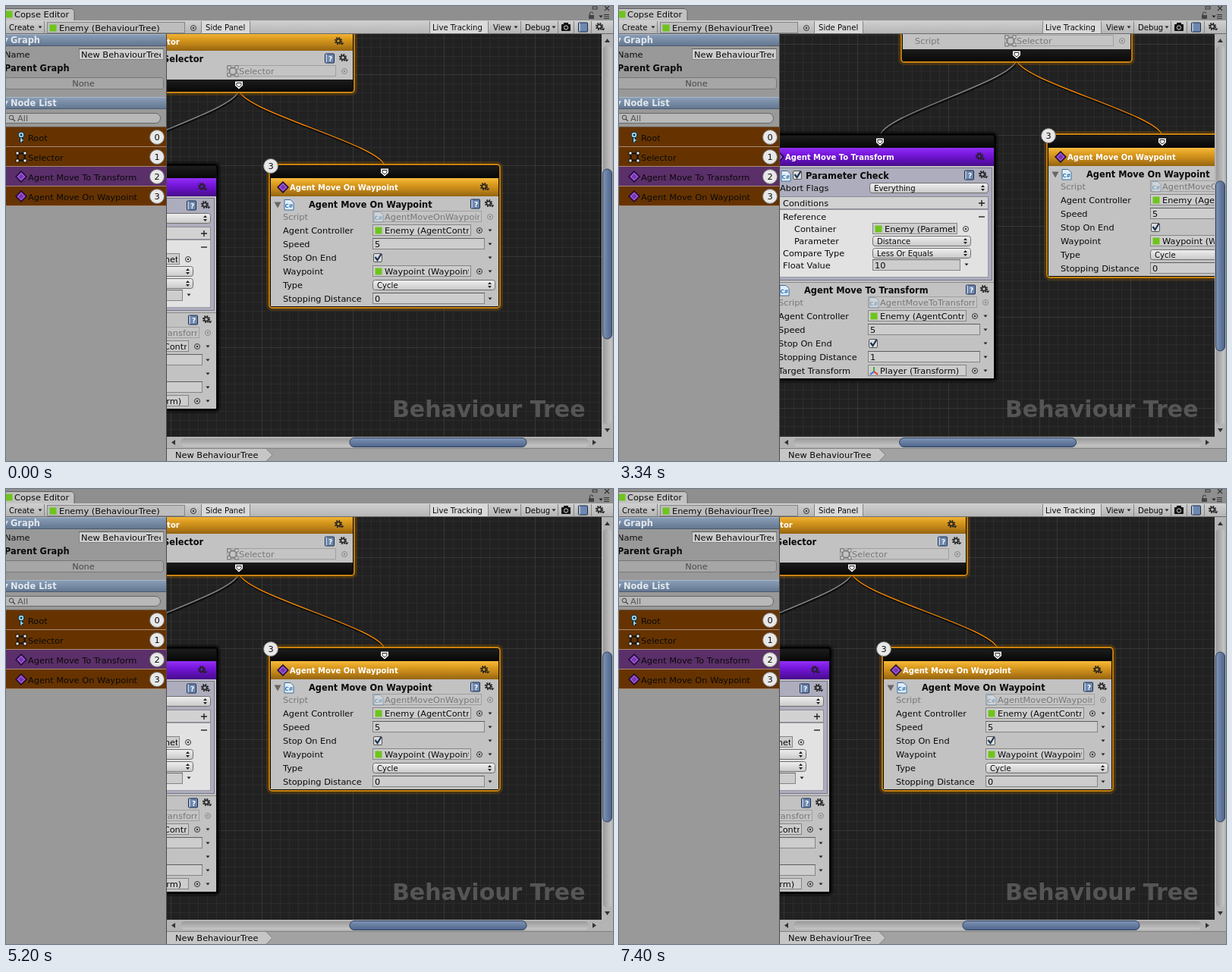
Recreate the animation shown at these times as an HTML page. Size 800 px wide and 600 px high, loop 9.23 s.

```html
<!DOCTYPE html>
<html lang="en">
<head>
<meta charset="utf-8">
<title>Behaviour Tree</title>
<style>
html, body { margin: 0; width: 100%; height: 100%; overflow: hidden; background: #999; }
svg { display: block; }
text { font: 11.35px "DejaVu Sans", sans-serif; fill: #0a0a0a; white-space: pre; }
text.b { font-weight: bold; font-size: 11.4px; }
text.h { font-weight: bold; font-size: 10px; fill: #fff; }
text.s { font-size: 10.1px; }
text.dim { fill: #777; }
.frame { fill: #0a0a0a; stroke: #000; stroke-width: 2; }
.glow { fill: none; stroke: #000; stroke-width: 6; opacity: .35; }
.head { fill: url(#purple); }
.on .frame { stroke: #c9830f; stroke-width: 1.8; }
.on .glow { stroke: #8a5500; }
.on .head { fill: url(#gold); }
.link { fill: none; stroke: #8c8c8c; stroke-width: 1.3; }
.link.on { stroke: #ff8a00; }
.row { fill: #5b2f69; }
.row.on { fill: #663300; }
</style>
</head>
<body>
<svg id="stage" width="800" height="600" viewBox="0 0 800 600"></svg>
<script>
const stage = document.getElementById('stage');

// drawing helpers: each returns SVG markup
const rect = (x, y, w, h, fill, more = '') =>
  `<rect x="${x}" y="${y}" width="${w}" height="${h}" fill="${fill}" ${more}/>`;
const text = (x, y, s, cls = '', more = '') => `<text x="${x}" y="${y}" class="${cls}" ${more}>${s}</text>`;
const path = (d, fill = 'none', stroke = 'none', w = 1, more = '') =>
  `<path d="${d}" fill="${fill}" stroke="${stroke}" stroke-width="${w}" ${more}/>`;
const disc = (x, y, r, fill, stroke = 'none') => `<circle cx="${x}" cy="${y}" r="${r}" fill="${fill}" stroke="${stroke}"/>`;
const group = (x, y, body) => `<g transform="translate(${x} ${y})">${body}</g>`;
const clip = (x, y, w, h, body) =>
  `<svg x="${x}" y="${y}" width="${w}" height="${h}" viewBox="${x} ${y} ${w} ${h}">${body}</svg>`;
const fade = (id, stops, flat) => `<linearGradient id="${id}" x2="${flat ? 1 : 0}" y2="${flat ? 0 : 1}">` +
  stops.map((c, i) => `<stop offset="${i / (stops.length - 1)}" stop-color="${c}"/>`).join('') + '</linearGradient>';

// small icons, centred on x, y
const arrow = (x, y) => path(`M${x - 2.5} ${y - 1.5}h5l-2.5 3z`, '#222');
const picker = (x, y, c = '#333') => disc(x, y, 3.5, 'none', c) + disc(x, y, 1.2, c);
const gear = (x, y, drop = true) =>
  `<circle cx="${x}" cy="${y}" r="4" fill="none" stroke="#222" stroke-width="2.2" stroke-dasharray="1.7 1.44"/>` +
  `<circle cx="${x}" cy="${y}" r="2.6" fill="none" stroke="#222" stroke-width="1.5"/>` + (drop ? arrow(x + 5, y + 4) : '');
const book = (x, y, mark = '?') => rect(x - 5.5, y - 6, 12, 12, '#6d88b0', 'rx="1" stroke="#1b2b48"') +
  path(`M${x - 4} ${y - 5.5}v11`, 'none', '#d5e0f0', 1.2) +
  text(x + 1.5, y + 3.5, mark, 'h', 'text-anchor="middle" style="font-size:9px"');
const script = (x, y, o = 1) => `<g opacity="${o}">` +
  path(`M${x - 6} ${y - 6.5}h8l4 4v9.5h-12z`, '#e3edf5', '#3b6f9f') +
  text(x, y + 4, 'C#', 'b', 'text-anchor="middle" style="fill:#2b78b8;font-size:7px"') + '</g>';
const asset = (x, y) => rect(x - 4.5, y - 4.5, 9, 9, '#6fc41c');
const axes = (x, y) => path(`M${x} ${y + 1}v-6`, 'none', '#3fae2a', 2) +
  path(`M${x} ${y + 1}l-5 4`, 'none', '#3b6fd8', 2) + path(`M${x} ${y + 1}l5 4`, 'none', '#d8452a', 2);
const boxes = (x, y, o = 1) => `<g opacity="${o}">` + rect(x - 4.5, y - 4.5, 9, 9, 'none', 'stroke="#111" stroke-width="2"') +
  [[-1, -1], [1, -1], [-1, 1], [1, 1]].map(([i, j]) => rect(x + i * 5 - 2, y + j * 5 - 2, 4, 4, '#eee', 'stroke="#111"')).join('') + '</g>';
const diamond = (x, y) => path(`M${x} ${y - 7}l7 7-7 7-7-7z`, '#7a35b4', '#1c0830', 1.4) +
  path(`M${x} ${y - 4.5}l4.5 4.5-4.5 4.5-4.5-4.5z`, 'none', '#c48cf0', .8);
const shield = (x, y) => path(`M${x - 5.5} ${y - 5}h11v6l-5.5 5-5.5-5z`, '#fff', '#111', 1) +
  path(`M${x - 3} ${y - 2.5}h6v3l-3 2.5-3-2.5z`, 'none', '#222', 1);
const badge = (x, y, n) => disc(x, y, 9.5, '#e8e8e8', '#777') + text(x, y + 4, n, '', 'text-anchor="middle"');
const fold = (x, y) => path(`M${x - 4.5} ${y - 3.5}h9l-4.5 8z`, '#666');

// form controls, y is the middle of the row
const field = (x, y, w, s) => rect(x + .5, y - 7.5, w - 1, 14, '#cdcdcd', 'stroke="#858585"') +
  path(`M${x} ${y - 7.5}h${w}`, 'none', '#5e5e5e') + text(x + 3, y + 4, s);
const popup = (x, y, w, s) => rect(x + .5, y - 6.5, w - 1, 13, 'url(#button)', 'rx="3" stroke="#6e6e6e"') +
  text(x + 6, y + 3.5, s, 's') + path(`M${x + w - 10} ${y - 1}h5l-2.5-3zM${x + w - 10} ${y + 1}h5l-2.5 3z`, '#222');
const check = (x, y) => rect(x - 5.5, y - 5.5, 11, 11, '#dcdcdc', 'rx="1.5" stroke="#555"') +
  path(`M${x - 3.5} ${y - 1}l3 4 5-8`, 'none', '#1d3555', 2.2);
const object = (x, y, w, s, icon = asset) => rect(x + .5, y - 7.5, w - 1, 14, '#cdcdcd', 'stroke="#858585"') +
  icon(x + 8, y) + clip(x, y - 8, w - 3, 16, text(x + 16, y + 4, s)) + picker(x + w + 11, y);
const ghost = (x, y, w, s, icon) => rect(x + .5, y - 7.5, w - 1, 14, '#c4c4c4', 'stroke="#a0a0a0"') +
  icon(x + 8, y, .4) + clip(x, y - 8, w - 3, 16, text(x + 16, y + 4, s, 'dim')) + picker(x + w + 11, y, '#888');

const control = {
  num: (y, s) => field(483, y, 148, s) + arrow(638, y),
  obj: (y, s) => object(483, y, 130, s) + arrow(638, y),
  pos: (y, s) => object(483, y, 130, s, axes) + arrow(638, y),
  tick: y => check(490, y) + arrow(638, y),
  pick: (y, s) => popup(483, y, 162, s)
};

const behaviour = (y, title, cls, rows) =>
  fold(358, y) + script(373, y) + text(399, y + 4, title, 'b') + book(618, y - 1) + gear(636, y - 2) +
  text(365, y + 20, 'Script', 'dim') + ghost(483, y + 16, 144, cls, script) +
  rows.map(([label, kind, s], i) => {
    const c = y + 34 + i * 18;
    return text(365, c + 4, label) + control[kind](c, s);
  }).join('');

const shell = (id, x, y, h, bodyY, bodyH, body) => `<g id="${id}">` +
  rect(x - 1, y - 1, 306, h + 2, 'none', 'class="glow" rx="5"') +
  rect(x, y, 304, h, 'none', 'class="frame" rx="4"') +
  rect(x + 2, y + 2, 300, 15, 'url(#slot)') +
  rect(x + 2, bodyY - 24, 300, 24, 'none', 'class="head"') +
  rect(x + 2, bodyY, 300, bodyH, '#c2c2c2') + body + '</g>';

const titleBar = (y, title, n) => badge(349, y - 28, n) + shield(499, y - 20) + diamond(365, y) +
  text(374, y + 4, title, 'h') + gear(630, y - 1);

const parameterCheck = () =>
  rect(351.5, 185.5, 295, 148, '#adadbd', 'stroke="#77778f"') +
  fold(360, 196) + script(375, 196) + check(390, 195) + text(401, 200, 'Parameter Check', 'b') +
  book(616, 195) + gear(634, 194) +
  text(367, 216, 'Abort Flags') + popup(485, 212, 157, 'Everything') +
  rect(366.5, 223.5, 275, 16, '#d2d2d2', 'stroke="#8b8b95"') + text(371, 236, 'Conditions') +
  path('M629 232h8M633 228v8', 'none', '#222', 1.4) +
  rect(366.5, 240.5, 275, 89, '#e2e2e2', 'stroke="#9a9aa4"') +
  text(371, 254, 'Reference') + path('M629 250h8', 'none', '#222', 1.4) +
  text(386, 270, 'Container') + object(489, 266, 112, 'Enemy (ParameterContainer)') +
  text(386, 286, 'Parameter') + popup(489, 282, 130, 'Distance') +
  text(371, 302, 'Compare Type') + popup(489, 298, 130, 'Less Or Equals') +
  text(371, 318, 'Float Value') + field(489, 314, 116, '10') + arrow(613, 313);

const moveTo = shell('move', 347, 141, 324, 183, 280,
  titleBar(171, 'Agent Move To Transform', 2) + parameterCheck() +
  path('M349 336.5h300', 'none', '#8a8a8a') +
  behaviour(347, 'Agent Move To Transform', 'AgentMoveToTransform', [
    ['Agent Controller', 'obj', 'Enemy (AgentController)'], ['Speed', 'num', '5'], ['Stop On End', 'tick'],
    ['Stopping Distance', 'num', '1'], ['Target Transform', 'pos', 'Player (Transform)']]));

const patrol = shell('patrol', 347, 209, 189, 251, 145,
  titleBar(239, 'Agent Move On Waypoint', 3) +
  behaviour(262, 'Agent Move On Waypoint', 'AgentMoveOnWaypoint', [
    ['Agent Controller', 'obj', 'Enemy (AgentController)'], ['Speed', 'num', '5'], ['Stop On End', 'tick'],
    ['Waypoint', 'obj', 'Waypoint (Waypoint)'], ['Type', 'pick', 'Cycle'], ['Stopping Distance', 'num', '0']]));

const selector = shell('selector', 155, 17, 97, 59, 38,
  boxes(172, 47) + text(182, 51, 'Selector', 'h') + gear(438, 46) +
  fold(166, 69) + boxes(181, 69) + text(207, 74, 'Selector', 'b') + book(426, 69) + gear(444, 68) +
  text(173, 90, 'Script', 'dim') + ghost(291, 86, 144, 'Selector', boxes) +
  rect(157, 97, 300, 16, 'url(#slot)') + shield(307, 104));

const link = (id, x) => {
  const d = `M307 110C307 138 ${x} 184 ${x} 212`;
  return group(1, 2, path(d, 'none', '#000', 2, 'opacity=".6"')) + `<path id="${id}" class="link" d="${d}"/>`;
};

const listRow = (i, name, icon, id = '') => {
  const y = 160 + i * 26;
  return `<rect id="${id}" class="row on" x="0" y="${y}" width="211" height="25"/>` +
    rect(0, y + 25, 211, 1, '#a98a72') + icon(20, y + 13) + text(29, y + 18, name) + badge(199, y + 13, i);
};
const key = (x, y) => path(`M${x} ${y}v7M${x} ${y + 4}h3`, 'none', '#123', 4) +
  path(`M${x} ${y}v6.5M${x} ${y + 4}h2.5`, 'none', '#8fd0e0', 2) +
  disc(x, y - 3, 4, '#8fd0e0', '#123') + disc(x, y - 3, 1.3, '#123');
const section = (y, name) => rect(0, y, 211, 16, 'url(#section)') + path(`M0 ${y + .5}h211`, 'none', '#a9b8ca') +
  path(`M0 ${y + 15.5}h211`, 'none', '#4b5b70') + path(`M-3 ${y + 5}h6l-3 6z`, '#d4dde8') +
  text(6, y + 12, name, 'b', 'style="fill:#e2e8ee"');

const sidebar = rect(0, 37, 211, 563, '#999') + section(37, 'Graph') +
  text(-2, 68, 'Name') + clip(96, 55, 112, 18, field(96, 64, 112, '') + clip(96, 56, 108, 16, text(99, 68, 'New BehaviourTree'))) +
  text(-2, 86, 'Parent Graph', 'b') +
  rect(-5, 94.5, 212.5, 15, '#a6a6a6', 'rx="3" stroke="#777"') +
  text(102, 106, 'None', '', 'text-anchor="middle" style="fill:#4a4a4a"') +
  section(120, 'Node List') +
  rect(-8, 141.5, 211.5, 13, '#b8b8b8', 'rx="6.5" stroke="#666"') +
  disc(7, 147, 2.8, 'none', '#444') + path('M9 149l3 3', 'none', '#444', 1.3) + text(15, 152, 'All', '', 'style="fill:#555"') +
  rect(0, 159, 211, 1, '#6e5a4a') +
  listRow(0, 'Root', key) + listRow(1, 'Selector', boxes) +
  listRow(2, 'Agent Move To Transform', diamond, 'rowMove') +
  listRow(3, 'Agent Move On Waypoint', diamond, 'rowPatrol') +
  rect(211, 37, 1, 563, '#4c4c4c');

const split = x => path(`M${x + .5} 20v17`, 'none', '#858585');
const toolbar = rect(0, 0, 800, 20, '#8f8f8f') +
  path('M-2 20V3.5H87l3 3V20z', '#c2c2c2', '#5f5f5f') + asset(4, 11) + text(11, 15, 'Copse Editor') +
  rect(773, 1, 6, 3, 'none', 'stroke="#333"') + path('M789 0l6 6m0-6l-6 6', 'none', '#333', 1.2) +
  rect(768, 12, 7, 5, '#444') + path('M769.5 12v-2a2 2 0 0 1 4 0', 'none', '#444', 1.2) +
  arrow(784, 14) + path('M788 11.5h7M788 14h7M788 16.5h7', 'none', '#333') +
  rect(0, 19, 800, 18, 'url(#bar)') + path('M0 36.5h800', 'none', '#6b6b6b') +
  text(4, 32, 'Create', 's') + arrow(45, 28) + split(50) +
  rect(54.5, 21.5, 181, 14, '#bdbdbd', 'stroke="#858585"') + asset(62, 29) + text(70, 33, 'Enemy (BehaviourTree)') +
  picker(247, 29) + rect(258, 20, 64, 16, '#dadada') + split(257) + split(321) + text(263, 32, 'Side Panel', 's') +
  rect(558, 20, 78, 16, '#dadada') + split(558) + split(635) + text(562, 32, 'Live Tracking', 's') +
  text(642, 32, 'View', 's') + arrow(672, 28) + split(678) + text(684, 32, 'Debug', 's') + arrow(722, 28) + split(727) +
  rect(732, 24, 12, 9, '#111', 'rx="1"') + rect(735, 22, 6, 3, '#111') + disc(738, 28.5, 2.6, '#111', '#ddd') +
  split(748) + book(760, 28, '') + split(771) + gear(782, 27);

const scrollbars = rect(785, 37, 15, 531, '#b4b4b4') + rect(787, 52, 11, 500, 'url(#trackV)', 'rx="5.5"') +
  path('M789 48l3.5-5 3.5 5zM789 557l3.5 5 3.5-5z', '#333') +
  rect(212, 568, 588, 15, '#b4b4b4') + rect(230, 570, 538, 11, 'url(#trackH)', 'rx="5.5"') +
  path('M223 572l-5 3.5 5 3.5zM773 572l5 3.5-5 3.5z', '#333') +
  rect(786.5, 0, 12, 224, 'url(#thumbV)', 'id="barV" rx="6" stroke="#2c3e5c"') +
  rect(0, 569.5, 233, 12, 'url(#thumbH)', 'id="barH" rx="6" stroke="#2c3e5c"');

const footer = rect(212, 583, 588, 17, '#a2a2a2') + path('M212 583.5h588', 'none', '#808080') +
  path('M212 584h131l8 8-8 8H212z', '#c6c6c6') + path('M343 584l8 8-8 8', 'none', '#858585') +
  text(223, 596, 'New BehaviourTree');

stage.innerHTML = '<defs>' +
  fade('gold', ['#f8bb3c', '#dc9c20', '#bd8218', '#946410']) +
  fade('purple', ['#9230f4', '#7a18e0', '#6010b8', '#460c88']) +
  fade('slot', ['#1c1c1c', '#080808']) +
  fade('button', ['#efefef', '#c9c9c9']) +
  fade('bar', ['#d0d0d0', '#b4b4b4']) +
  fade('section', ['#8b9fb8', '#61758f']) +
  fade('trackV', ['#9a9a9a', '#c6c6c6'], true) + fade('trackH', ['#9a9a9a', '#c6c6c6']) +
  fade('thumbV', ['#7f95b6', '#4d648a'], true) + fade('thumbH', ['#7f95b6', '#4d648a']) +
  `<pattern id="grid" width="120" height="120" patternUnits="userSpaceOnUse">${
    path(Array.from({ length: 10 }, (_, i) => `M${i * 12 + .5} 0v120M0 ${i * 12 + .5}h120`).join(''), 'none', '#2b2b2b')
  }${path('M.5 0v120M0 .5h120', 'none', '#363636')}</pattern></defs>` +
  clip(212, 37, 573, 531, rect(212, 37, 573, 531, '#212121') +
    '<g id="view">' + group(229, 142, rect(-720, -600, 2160, 1800, 'url(#grid)')) + '</g>' +
    text(509, 542, 'Behaviour Tree', '', 'style="font-size:30px;font-weight:bold;fill:#555"') +
    '<g id="nodes">' + group(372, -68, link('linkMove', 127) + link('linkPatrol', 499)) + moveTo +
    group(372, -68, patrol + selector) + '</g>') +
  scrollbars + footer + sidebar + toolbar;

const el = id => document.getElementById(id);
el('selector').classList.add('on');

const LOOP = 9230;
const onMove = [0, 0], onMoveLow = [0, 33.5], onPatrol = [-372, 68];
// start, end, steps, where to, time of the first step, its share of the way
const moves = [
  [2240, 2420, 4, onMove, 60, .1],
  [3170, 3460, 6, onPatrol, 60, .1],
  [4270, 4420, 3, onMove, 60, .1],
  [4950, 5200, 8, onPatrol, 36, .1],
  [6280, 6420, 4, onMoveLow, 47, .1],
  [7130, 7400, 6, onPatrol, 90, .043]
];

function pose(t) {
  let from = onPatrol, patrolling = true;
  for (const [start, end, n, to, hold, first] of moves) {
    if (t < start) break;
    patrolling = to === onPatrol;
    if (t < end) {
      const late = t - start - hold;
      const k = late < 0 ? 0 : 1 + Math.floor(late / (end - start - hold) * (n - 2));
      const u = k / (n - 1);
      const f = first + (1 - first) * u * u * (3 - 2 * u);
      return { at: from.map((v, i) => Math.round(v + (to[i] - v) * f)), patrolling };
    }
    from = to;
  }
  return { at: from.map(Math.round), patrolling };
}

function draw(t) {
  const { at: [x, y], patrolling } = pose(t);
  for (const id of ['view', 'nodes']) el(id).setAttribute('transform', `translate(${x} ${y})`);
  el('barH').setAttribute('x', 310 - x * .3844);
  el('barV').setAttribute('y', 242 - y * .397);
  for (const id of ['patrol', 'linkPatrol', 'rowPatrol']) el(id).classList.toggle('on', patrolling);
  for (const id of ['move', 'linkMove', 'rowMove']) el(id).classList.toggle('on', !patrolling);
}

const begin = performance.now();
function tick() {
  draw((performance.now() - begin) % LOOP);
  requestAnimationFrame(tick);
}
tick();
</script>
</body>
</html>
```
